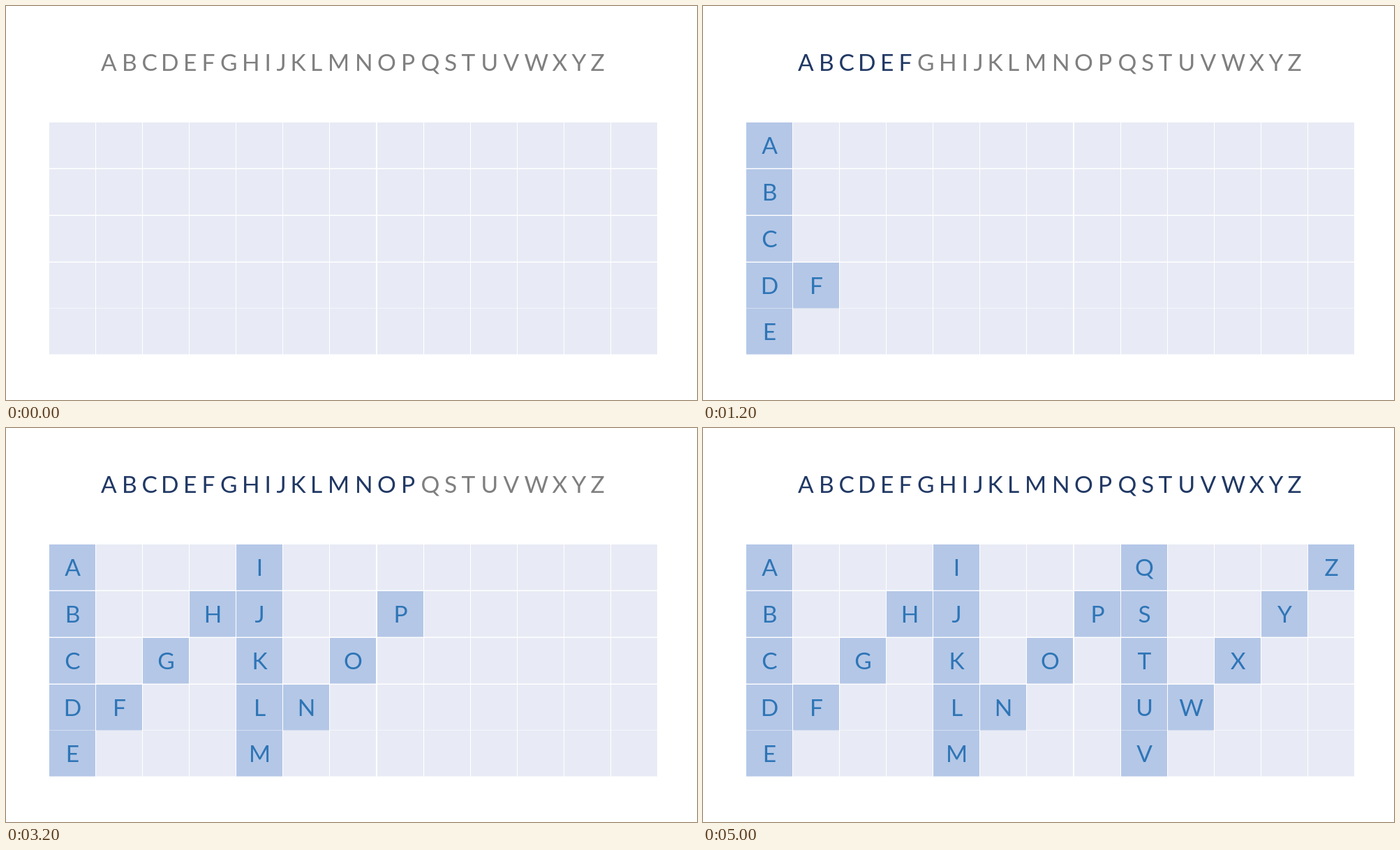
An HTML page with a canvas for the animation above (5200 ms loop, 990x565 px).

```html
<!DOCTYPE html>
<html lang="en">
<head>
<meta charset="utf-8">
<title>Zigzag alphabet</title>
<style>
  html, body { margin: 0; width: 100%; height: 100%; overflow: hidden; background: #fff; }
  canvas { display: block; width: 990px; height: 565px; }
</style>
</head>
<body>
<canvas id="stage" width="990" height="565"></canvas>
<script>
const ctx = document.getElementById('stage').getContext('2d');

const LETTERS = 'ABCDEFGHIJKLMNOPQSTUVWXYZ';
// Optical centre of each heading letter
const HEAD_X = [147.5, 177.5, 206, 235.5, 264.5, 291, 319, 351, 375.5, 393.5, 420.5, 446, 477,
                513, 545.5, 577.5, 608.5, 637, 662.5, 692.5, 724, 760, 793.5, 821, 847.5];
const STEP = 200, LOOP = 5200;
const COLS = 13, ROWS = 5;
const CELL_W = 66, CELL_H = 65.5;
const FONT = '33.5px Lato, Carlito, sans-serif';
const COLOR = { cell: '#e8ebf5', lit: '#b4c7e7', letter: '#2e75b6', idle: '#7f7f7f', used: '#203864' };

const cellX = col => Math.round(62 + 67.08 * col);
const cellY = row => Math.round(166.8 + 66.9 * row);

// Down a full column, then diagonally up to the top of the next one
function cellOf(i) {
  const k = i % 8, start = 4 * Math.floor(i / 8);
  return k < ROWS ? [start, k] : [start + k - 4, 8 - k];
}

function fillCell(col, row, color) {
  ctx.fillStyle = color;
  ctx.fillRect(cellX(col), cellY(row), CELL_W, CELL_H);
}

function drawHeading(count) {
  ctx.textAlign = 'left';
  [...LETTERS].forEach((ch, i) => {
    const m = ctx.measureText(ch);
    const inkMid = (m.actualBoundingBoxRight - m.actualBoundingBoxLeft) / 2;
    ctx.fillStyle = i < count ? COLOR.used : COLOR.idle;
    ctx.fillText(ch, HEAD_X[i] - inkMid, 93);
  });
}

function drawGrid(count) {
  for (let row = 0; row < ROWS; row++)
    for (let col = 0; col < COLS; col++) fillCell(col, row, COLOR.cell);

  ctx.textAlign = 'center';
  for (let i = 0; i < count; i++) {
    const [col, row] = cellOf(i);
    fillCell(col, row, COLOR.lit);
    ctx.fillStyle = COLOR.letter;
    ctx.fillText(LETTERS[i], cellX(col) + CELL_W / 2 + 0.5, cellY(row) + 45.3);
  }
}

function draw() {
  const count = Math.floor((performance.now() % LOOP) / STEP);
  ctx.fillStyle = '#fff';
  ctx.fillRect(0, 0, 990, 565);
  ctx.font = FONT;
  drawHeading(count);
  drawGrid(count);
  requestAnimationFrame(draw);
}
draw();
</script>
</body>
</html>
```
